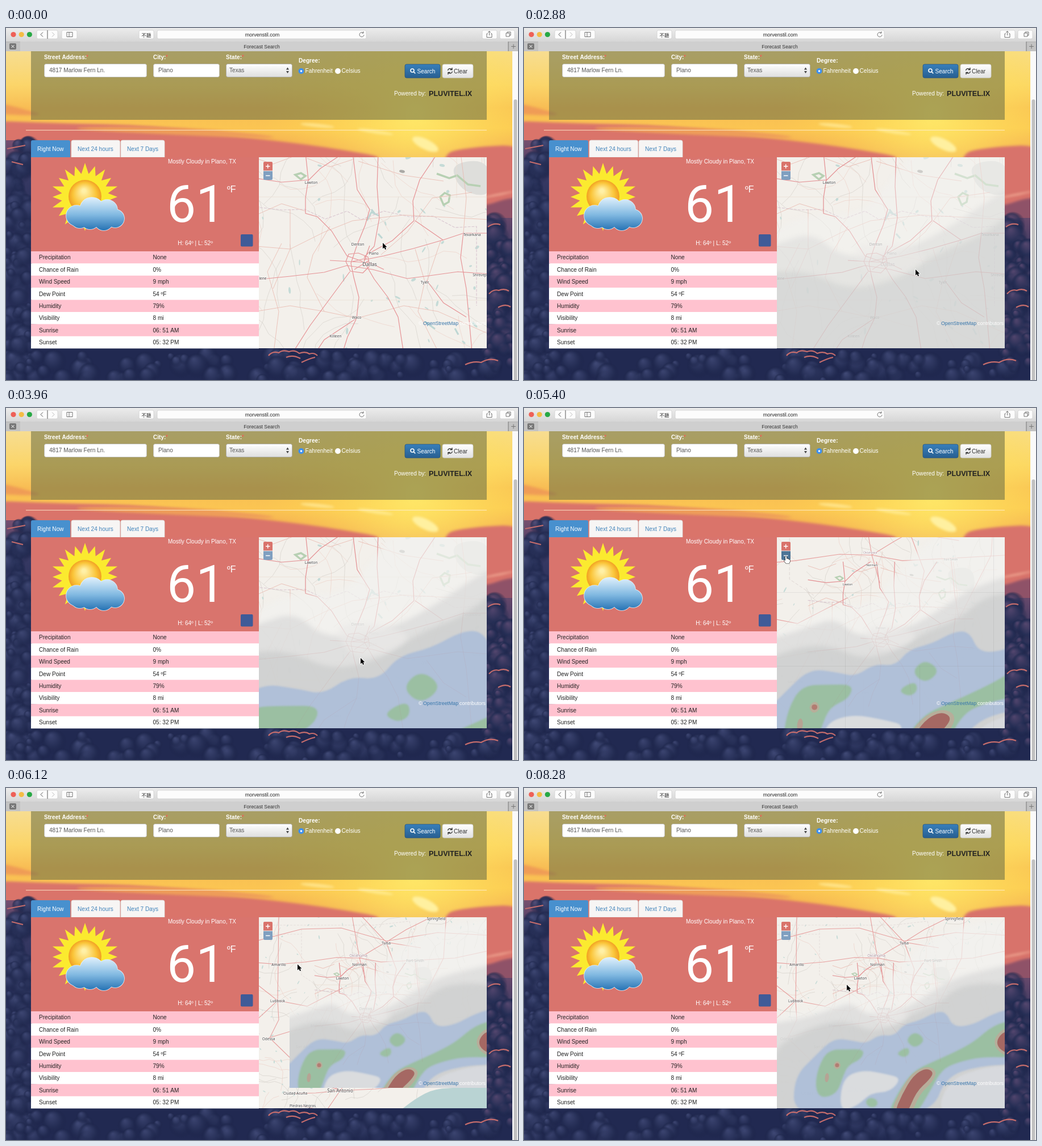
Recreate the animation shown at these times as an HTML page with a canvas. Size 901x621 px, loop 8640 ms.

```html
<!DOCTYPE html>
<html lang="en">
<head>
<meta charset="utf-8">
<title>Forecast Search</title>
<style>
html, body { margin: 0; width: 100%; height: 100%; overflow: hidden; }
canvas { display: block; }
</style>
</head>
<body>
<canvas id="stage" width="901" height="621"></canvas>
<script>
const STEP = 360, STEPS = 24;
const SANS = '"Liberation Sans", Arial, sans-serif';
const MAP = { x: 445, y: 228, w: 401, h: 337, cx: 645.75, cy: 396.5 };
const stage = document.getElementById('stage').getContext('2d');
let c = stage;

function rng(seed) {
  return () => (seed = (seed * 16807) % 2147483647) / 2147483647;
}
function rect(x, y, w, h, fill) {
  c.fillStyle = fill;
  c.fillRect(x, y, w, h);
}
function box(x, y, w, h, r, fill, line) {
  c.beginPath();
  c.roundRect(x, y, w, h, r);
  c.fillStyle = fill;
  c.fill();
  if (line) { c.lineWidth = 0.8; c.strokeStyle = line; c.stroke(); }
}
function disc(x, y, r, fill) {
  c.beginPath();
  c.arc(x, y, r, 0, 7);
  c.fillStyle = fill;
  c.fill();
}
function ellipse(x, y, rx, ry, turn, fill) {
  c.beginPath();
  c.ellipse(x, y, rx, ry, turn, 0, 7);
  c.fillStyle = fill;
  c.fill();
}
function text(s, x, y, color, size = 10.1, align = 'left', weight = '', family = SANS) {
  c.font = `${weight} ${size}px ${family}`;
  c.textAlign = align;
  c.fillStyle = color;
  c.fillText(s, x, y);
}
function line(d, color, width = 1) {
  c.strokeStyle = color;
  c.lineWidth = width;
  c.stroke(new Path2D(d));
}
function shade(y0, y1, ...stops) {
  const g = c.createLinearGradient(0, y0, 0, y1);
  stops.forEach((s, i) => g.addColorStop(i / (stops.length - 1), s));
  return g;
}
// Closed smooth shape through the midpoints of the given corners.
function blob(points, fill) {
  const at = i => points[i % points.length];
  const mid = i => [(at(i)[0] + at(i + 1)[0]) / 2, (at(i)[1] + at(i + 1)[1]) / 2];
  c.beginPath();
  c.moveTo(...mid(0));
  for (let i = 1; i <= points.length; i++) c.quadraticCurveTo(...at(i), ...mid(i));
  c.fillStyle = fill;
  c.fill();
}

function drawSky() {
  const g = c.createLinearGradient(0, 41, 0, 240);
  [[0, '#f7dd91'], [0.3, '#fbd569'], [0.5, '#f8bd54'], [0.68, '#fbc552'], [0.85, '#f3a953'], [1, '#e38660']]
    .forEach(s => g.addColorStop(...s));
  rect(0, 41, 891, 200, g);
  const glow = c.createRadialGradient(720, 150, 5, 720, 150, 270);
  glow.addColorStop(0, 'rgba(255,233,105,.95)');
  glow.addColorStop(1, 'rgba(255,217,75,0)');
  rect(0, 41, 891, 190, glow);
  c.filter = 'blur(2px)';
  blob([[-30, 128], [40, 145], [70, 155], [-30, 152]], '#ef9c56');
  blob([[-60, 162], [90, 168], [260, 172], [420, 193], [560, 209], [710, 236], [300, 250], [-60, 250]], '#da746a');
  blob([[60, 176], [300, 172], [520, 196], [340, 191]], '#ee9d59');
  ellipse(738, 205, 25, 9, 0.45, '#fff0a0');
  ellipse(650, 183, 32, 3, 0.15, '#ffe98a');
  ellipse(548, 172, 30, 3, 0.1, '#ffe48a');
  blob([[760, 224], [815, 210], [930, 205], [930, 340], [800, 330]], '#d8736b');
  ellipse(866, 294, 28, 1.5, -0.2, '#f1aa94');
  blob([[800, 320], [850, 312], [885, 299], [930, 300], [930, 650], [800, 640]], '#8f5268');
  c.filter = 'none';
  rect(0, 198, 46, 430, shade(198, 330, '#774f6e', '#373963', '#29305a'));
  rect(846, 335, 45, 286, shade(335, 400, '#67486b', '#32365f'));
  rect(0, 560, 891, 61, '#212951');
  const rand = rng(83);
  for (let i = 0; i < 280; i++) {
    const zone = i % 3, r = 7 + rand() * 17;
    const x = zone === 0 ? rand() * 44 : zone === 1 ? 846 + rand() * 45 : rand() * 891;
    const y = zone === 0 ? 205 + rand() * 400 : zone === 1 ? 345 + rand() * 260 : 578 + rand() * 45;
    const puff = c.createRadialGradient(x - r / 4, y - r / 2, 1, x, y, r);
    puff.addColorStop(0, zone === 1 ? 'rgba(87,72,112,.8)' : 'rgba(66,75,120,.75)');
    puff.addColorStop(0.6, 'rgba(37,46,85,.75)');
    puff.addColorStop(1, 'rgba(25,32,68,0)');
    disc(x, y, r, puff);
  }
  line('M462 578q7-9 18-5q7-6 18-2q10-4 18 3q11-4 18 1q8-3 14 3M493 581q12-5 25 2M520 590q14-7 24-9M808 594q14-7 28-4q15-9 30-3M850 469q8-9 17-6q10-4 18 1M848 351q10-8 22-4M866 493q13-7 22-1M2 213l32-6M10 236l20 5', '#c66d6c', 2.2);
  rect(891, 41, 10, 580, '#fafafa');
  box(893.5, 126, 6, 510, 3, '#c1c1c1');
}

function drawBrowser() {
  rect(0, 0, 901, 24, shade(0, 24, '#ececec', '#d6d6d6'));
  rect(0, 24, 901, 17, '#c3c3c3');
  rect(0, 24, 901, 0.7, '#aaa');
  rect(25, 24, 859, 17, '#cfcfcf');
  ['#ee6057', '#f4bc44', '#28a945'].forEach((f, i) => disc(13 + i * 14.2, 11.5, 4.6, f));
  [[54, 37], [98, 27], [234, 26], [266, 368], [838, 26], [869, 26]]
    .forEach(([x, w]) => box(x, 4, w, 15, 2.5, '#fcfcfc', '#d0d0d0'));
  line('M65 7.5l-4 4l4 4M73 4v15', '#555');
  line('M81 7.5l4 4l-4 4', '#bbb');
  line('M107 7.5h10v8h-10zM111 7.5v8M848 10h-2v6.500h9v-6.500h-2M850.500 13v-7M848 8l2.500-2.500l2.500 2.500M880 9h6v6h-6zM882 9v-2h6v6h-2M629 9a4 4 0 1 0 1 3M629 6v3h-3', '#666', 0.9);
  text('不聽', 247, 16, '#333', 8.5, 'center', '', '"Noto Sans CJK TC", "Noto Sans CJK SC", sans-serif');
  text('morvenstil.com', 451, 15, '#222', 9, 'center');
  text('Forecast Search', 450, 36, '#333', 8.7, 'center');
  box(6, 27, 12, 11, 2, '#777');
  line('M9.500 30l5 5m0-5l-5 5', '#fff');
  line('M889 32.500h8M893 28.500v8M884 24v17', '#777');
}

function drawForm() {
  rect(44, 41, 802, 121, 'rgba(113,115,72,.58)');
  [['Street Address:', 67, 141, 55], ['City:', 259, 281, 55], ['State:', 387, 415, 55], ['Degree:', 515, 0, 61]]
    .forEach(([s, x, star, y]) => {
      text(s, x, y, '#fff', 10.1, 'left', 'bold');
      if (star) text('*', star, y, '#f55', 10);
    });
  box(67.5, 63.5, 180, 23, 3, '#fff', '#bbb');
  box(259.5, 63.5, 116, 23, 3, '#fff', '#bbb');
  box(387.5, 63.5, 116, 23, 3, shade(63, 87, '#fff', '#dedede'), '#aaa');
  text('4817 Marlow Fern Ln.', 76, 78, '#555');
  text('Plano', 268, 78, '#555');
  text('Texas', 393, 78, '#555');
  c.fillStyle = '#444';
  c.fill(new Path2D('M493 73.500l2.500-4l2.500 4zM493 76l2.500 4l2.500-4z'));
  disc(519.5, 76, 5, '#3c8ff0');
  disc(519.5, 76, 1.8, '#fff');
  disc(584, 76, 5, '#fff');
  text('Fahrenheit', 526.5, 79, '#fff');
  text('Celsius', 590.5, 79, '#fff');
  box(702, 64, 62, 24, 3, shade(64, 88, '#377fbb', '#285f91'), '#245580');
  box(768, 64, 54, 24, 3, shade(64, 88, '#fff', '#e2e2e2'), '#ccc');
  line('M718 75a3 3 0 1 0-6 0a3 3 0 1 0 6 0M717.300 77.300l3 3', '#fff', 1.6);
  line('M777.500 75a4 4 0 0 1 7-2M785.500 76.500a4 4 0 0 1-7 2M785 70v3.500h-3.500M778 82v-3.500h3.500', '#333', 1.3);
  text('Search', 723.5, 80, '#fff');
  text('Clear', 788, 80, '#333');
  text('Powered by:', 683, 119, '#fff');
  text('PLUVITEL.IX', 744, 119.5, '#222', 12.6, 'left', 'bold');
  rect(35, 179.7, 811, 1.2, 'rgba(255,239,210,.75)');
  box(44, 198, 69, 31, [3, 3, 0, 0], '#4890ce');
  box(115, 198, 85.5, 30, [3, 3, 0, 0], '#f7f5f4', '#ddd');
  box(202, 198, 77, 30, [3, 3, 0, 0], '#f7f5f4', '#ddd');
  text('Right Now', 55, 217, '#fff');
  text('Next 24 hours', 126, 217, '#4184bb');
  text('Next 7 Days', 213, 217, '#4184bb');
}

function drawSun() {
  c.beginPath();
  for (let i = 0; i < 40; i++) {
    const r = i % 2 ? 41 : i % 4 ? 57 : 60, a = i * Math.PI / 20 - Math.PI / 2;
    c.lineTo(139 + r * Math.cos(a), 298 + r * Math.sin(a));
  }
  c.closePath();
  c.fillStyle = '#fbea2f';
  c.fill();
  const g = c.createRadialGradient(137, 287, 3, 139, 297, 30);
  g.addColorStop(0, '#fff0a6');
  g.addColorStop(0.65, '#fac438');
  g.addColorStop(1, '#f09a20');
  disc(139, 297, 29, g);
  const puffs = [[124, 331, 18], [151, 320, 21], [178, 321, 18], [192, 336, 16], [172, 340, 17], [148, 338, 17], [130, 336, 17]];
  puffs.forEach(([x, y, r]) => disc(x, y, r + 0.8, '#e5f2fb'));
  const blue = shade(300, 358, '#dceefa', '#83bae2', '#2370b2');
  puffs.forEach(([x, y, r]) => disc(x, y, r, blue));
}

function drawWeather() {
  rect(44, 228, 401, 166, '#d9746d');
  drawSun();
  text('Mostly Cloudy in Plano, TX', 345, 239, '#fff', 10, 'center');
  text('61', 283, 342, '#fff', 91, 'left', '', 'Roboto, sans-serif');
  text('ºF', 389, 290, '#fff', 16);
  text('H: 64º | L: 52º', 333, 383, '#fff', 10, 'center');
  box(413, 364, 21.5, 21.5, 2, '#3f5b98');
  const rows = [['Precipitation', 'None'], ['Chance of Rain', '0%'], ['Wind Speed', '9 mph'], ['Dew Point', '54 ºF'],
    ['Humidity', '79%'], ['Visibility', '8 mi'], ['Sunrise', '06: 51 AM'], ['Sunset', '05: 32 PM']];
  rows.forEach(([name, value], i) => {
    const y = 394 + i * 21.4;
    rect(44, y, 401, 21.6, i % 2 ? '#fff' : '#ffc2cf');
    text(name, 58, y + 14.4, '#222');
    text(value, 258.5, y + 14.4, '#222');
  });
}

const roads = {
  red: `M527 220L532 268L527 300L527 327L548 333L573 358L600 402L628 412M595 220L553 248L531 270M610 220L618 285L640 320
    L632 348L617 385L607 415L612 440L621 475L617 512L601 545L590 580M640 384L630 412L648 443L672 475L690 510L700 575
    M440 444L500 438L560 431L600 419L645 426L706 442L745 437L795 430L850 434M630 409L665 402L717 389L769 374L805 362L850 362
    M655 220L653 280L657 335L648 385L630 405M760 220L728 268L716 305L718 340L680 375L640 397M440 265L485 272L532 268
    M570 410L640 414L665 426M598 412L603 399L620 397L637 404L640 420L628 432L606 429Z M610 412L635 406M613 426L639 410
    M805 360L800 405L810 460L820 570M740 445L770 485L810 510M617 512L560 550L540 580M720 340L769 374M500 580L535 525L605 430`,
  pale: `M440 330L485 310L527 323M440 385L500 390L560 360L610 340L700 330L850 338M440 500L500 490L560 500L617 512L700 490L760 500L850 540
    M470 580L480 500L460 430L485 380M440 230L470 240L510 225M570 350L540 400L530 440L560 500M660 400L706 360L750 300L820 290
    M720 390L737 447L725 500L760 570M620 235L700 260L770 270M765 375L740 450M500 320L500 390L470 460M530 230L570 245L610 232M800 220L810 300L805 360`,
  border: 'M440 316L486 321L526 320L562 337L600 323L625 338L665 323L710 333L752 332L790 352L828 350V490'
};
const wideRoads = `M622 300L582 299L527 307L479 311L440 308M622 300L648 284L669 272L704 250L740 232L770 220M622 300L660 307L720 304L790 300L850 287
  M622 300L608 220M480 220L479 311L478 375L480 409L464 441M440 270L520 249L590 247L670 270L760 255L850 260M478 375L530 385L592 353
  M462 441L505 428L546 421M612 454L612 500L588 534L560 575M588 534L650 531L715 525L780 520M672 450L700 490L715 525M588 534L540 515L464 441
  M546 421L527 457L550 510L588 534M509 539L545 538L588 534M522 561L560 570M669 272L687 320L681 350M720 304L725 350L730 379M775 220L770 300L730 379M622 300L632 335M440 345L478 375L440 410M620 220L669 272L730 282`;

const labelsNear = [['Lawton', 537, 275], ['Denton', 619, 384], ['Plano', 647, 400], ['Dallas', 640, 419.5, 9], ['Texarkana', 820, 366.5],
  ['Shreveport', 838, 438], ['Tyler', 737, 451], ['Waco', 617, 513], ['Killeen', 580, 545.5], ['Abilene', 447, 444]];
const labelsFar = [['Springfield', 757, 232.5], ['Tulsa', 669, 275.5], ['Oklahoma', 620, 298], ['Amarillo', 480, 313.5], ['Norman', 622, 313.5],
  ['Fort Smith', 720, 306.5], ['Lawton', 592, 337.5], ['Lubbock', 478, 378], ['Denton', 633, 392], ['Dallas', 641, 409, 8], ['Abilene', 547, 422],
  ['Odessa', 462, 444.5], ['San Angelo', 527, 459], ['Waco', 614, 472], ['Austin', 612, 504], ['San Antonio', 588, 536.5, 8],
  ['Shreveport', 741, 418], ['Ciudad Acuña', 509, 540.5], ['Piedras Negras', 522, 563]];

function zoomTo(k) {
  c.translate(MAP.cx, MAP.cy);
  c.scale(k, k);
  c.translate(-MAP.cx, -MAP.cy);
}

function drawTerrain(k) {
  c.save();
  zoomTo(k);
  const rand = rng(2718), px = 1 / k;
  for (let i = 0; i < 130; i++) {
    let x = 200 + rand() * 900, y = 30 + rand() * 740, a = rand() * 6.3;
    c.beginPath();
    c.moveTo(x, y);
    for (let j = 0; j < 7; j++) {
      a += (rand() - 0.5) * 1.1;
      x += Math.cos(a) * 22;
      y += Math.sin(a) * 22;
      c.lineTo(x, y);
    }
    c.lineWidth = 0.65 * px;
    c.strokeStyle = i % 3 ? '#d4d0c9' : '#edcfc6';
    c.stroke();
  }
  for (let i = 0; i < 150; i++) {
    const x = 200 + rand() * 900, y = 30 + rand() * 740;
    ellipse(x, y, 2 + rand() * 5, 1 + rand() * 1.6, rand() * 3, '#c5dbd7');
  }
  blob([[785, 238], [850, 232], [855, 295], [816, 294], [791, 272]], '#dededb');
  line('M758 257l22 8l14-5l19 16l22 3M764 298l8-7l9 4l-2 12l-9 5zM509 259l10-3l8 5l-8 6z', '#b7d0b3', 3.5);
  line('M635 340l8-15l13 6M755 531l-18-13M790 530l6 11M655 363l7 8M650 329l-7-9', '#bed7d4', 3);
  ellipse(697, 253, 5, 2.5, 0.2, '#aaa9a5');
  line('M440 298H850M440 480H850M793 220V300', '#eadfd4', 0.8 * px);
  c.setLineDash([5 * px, 2 * px]);
  line(roads.border, '#d9c6d0', 1.1 * px);
  c.setLineDash([]);
  line(roads.pale, '#e9b8ae', 0.8 * px);
  line(roads.red, '#e69396', 1.2 * px);
  c.restore();
  if (k === 1) return;
  c.save();
  zoomTo(2 * k);
  blob([[680, 580], [720, 548], [755, 530], [802, 529], [870, 515], [880, 610], [700, 610]], '#b9d3d3');
  c.setLineDash([4, 2]);
  line('M440 242H648L710 235M520 249V330L550 350M440 258H519M710 235L730 320L731 380', '#ded6d4', 0.7);
  c.setLineDash([]);
  line(wideRoads, '#e7a09f', 0.55 / k);
  c.restore();
}

function drawLabels(k) {
  const near = k === 1, z = near ? 1 : 2 * k;
  for (const [name, x, y, size = 6.5] of near ? labelsNear : labelsFar) {
    const lx = MAP.cx + (x - MAP.cx) * z, ly = MAP.cy + (y - MAP.cy) * z;
    c.font = `${k > 0.6 && !near ? 5 : size}px "Noto Sans", sans-serif`;
    c.textAlign = 'center';
    c.lineWidth = 1.5;
    c.strokeStyle = 'rgba(255,255,255,.7)';
    c.strokeText(name, lx, ly);
    c.fillStyle = name === 'Oklahoma' ? '#a7919d' : '#484848';
    c.fillText(name, lx, ly);
  }
}

function drawClouds(alpha) {
  c.globalAlpha = alpha;
  c.filter = 'blur(4px)';
  blob([[390, 405], [470, 399], [535, 382], [570, 362], [622, 363], [650, 325], [700, 275], [760, 246], [860, 228], [920, 240], [920, 640], [390, 640]], 'rgba(242,241,239,.72)');
  blob([[390, 420], [480, 410], [545, 389], [577, 378], [603, 402], [655, 396], [700, 373], [750, 337], [840, 314], [920, 300], [920, 640], [390, 640]], 'rgba(216,216,215,.68)');
  blob([[430, 465], [490, 430], [535, 413], [574, 413], [610, 430], [655, 419], [685, 397], [728, 381], [770, 345], [860, 345], [910, 360], [900, 640], [430, 630]], 'rgba(199,200,201,.58)');
  blob([[610, 389], [650, 388], [683, 399], [655, 416], [625, 418]], 'rgba(234,233,231,.7)');
}

function drawRain(alpha) {
  c.globalAlpha = alpha;
  c.filter = 'blur(1.5px)';
  blob([[475, 510], [515, 470], [545, 441], [580, 446], [602, 451], [625, 435], [651, 438], [668, 417], [697, 410], [724, 395], [743, 395], [755, 422],
    [790, 418], [825, 398], [880, 382], [880, 487], [800, 490], [742, 510], [720, 570], [620, 585], [475, 580]], '#aebfd8');
  blob([[560, 512], [595, 497], [640, 505], [664, 512], [645, 536], [610, 538], [588, 560], [555, 572]], '#dcdddf');
  blob([[745, 515], [815, 491], [870, 490], [870, 590], [725, 585]], '#d7d9dd');
  const green = '#9abf9f', tan = '#b9ad99', red = '#a46460';
  blob([[518, 492], [535, 462], [570, 461], [599, 461], [594, 478], [570, 489], [561, 510], [551, 539], [522, 548], [512, 527]], green);
  blob([[671, 445], [688, 429], [707, 444], [688, 460]], green);
  blob([[654, 468], [676, 456], [679, 469], [668, 476]], green);
  blob([[638, 580], [659, 535], [684, 500], [715, 485], [756, 467], [792, 448], [826, 418], [870, 407], [870, 476], [807, 474], [762, 484], [735, 497], [715, 534], [688, 580]], green);
  ellipse(612, 555, 10, 8, 0.2, green);
  c.filter = 'blur(.7px)';
  blob([[644, 575], [661, 536], [683, 502], [710, 490], [727, 499], [719, 519], [696, 540], [680, 580]], tan);
  blob([[651, 575], [665, 541], [685, 507], [707, 494], [721, 501], [714, 514], [690, 536], [673, 578]], red);
  blob([[543, 489], [552, 480], [559, 490], [550, 498]], tan);
  ellipse(551, 489, 3.5, 3.5, 0, '#b17970');
  ellipse(533, 511, 3.5, 8, 0.1, '#b8a293');
  blob([[825, 446], [842, 424], [870, 420], [870, 480], [836, 468]], tan);
  blob([[830, 447], [845, 428], [870, 430], [870, 474], [839, 464]], red);
}

function drawOverlay(i, k) {
  if (i < 7) return;
  c.save();
  if (i === 16 || i === 17) {
    c.beginPath();
    c.rect(499, 228, 347, 301);
    c.clip();
  }
  zoomTo(2 * k);
  drawClouds(i === 7 ? 0.35 : i === 8 ? 0.7 : 1);
  if (i > 8) drawRain(i === 9 ? 0.3 : i === 10 ? 0.65 : 0.94);
  c.restore();
  // A trace of the terrain stays readable through the weather layer.
  c.save();
  c.globalAlpha = 0.09;
  zoomTo(k);
  line(roads.red, '#b86f75', 1 / k);
  c.restore();
}

function drawMap(i) {
  const k = i < 15 ? 1 : i === 15 ? 0.71 : 0.5;
  c.save();
  c.beginPath();
  c.rect(MAP.x, MAP.y, MAP.w, MAP.h);
  c.clip();
  rect(MAP.x, MAP.y, MAP.w, MAP.h, '#f3f0eb');
  drawTerrain(k);
  drawLabels(k);
  drawOverlay(i, k);
  if (i === 15) line('M565.500 325V565M696.500 455V565M826.500 228V565M445 325.500H846M445 455.500H846', 'rgba(120,120,120,.18)', 0.7);
  text('©', 726, 524, '#fff', 8.8);
  text('OpenStreetMap', 734, 524, '#3977ac', 8.8);
  text('contributors', 798, 524, '#fff', 8.8);
  box(453, 236, 16, 15.5, [2, 2, 0, 0], '#d9736b');
  box(453, 252.5, 16, 15.5, [0, 0, 2, 2], i >= 14 && i <= 16 ? '#4d7596' : '#7f9fc0');
  line('M457 244h7.500M460.700 240.300v7.500M457 260.500h7.500', '#fff', 1.4);
  c.restore();
}

const trail = [[0, 663, 379], [5, 694, 400], [6, 696, 402], [8, 689, 426], [11, 624, 441], [12, 545, 360],
  [13, 470, 285], [14, 461, 262], [16, 461, 262], [17, 513, 311], [23, 568, 347]];

function drawPointer(i) {
  const n = Math.max(1, trail.findIndex(p => p[0] >= i));
  const [a, x0, y0] = trail[n - 1], [b, x1, y1] = trail[n], f = (i - a) / (b - a);
  const hand = i >= 14 && i <= 16;
  c.save();
  c.translate(x0 + (x1 - x0) * f, y0 + (y1 - y0) * f);
  const shape = new Path2D(hand
    ? 'M-1 0Q0-1.500 1 0V4Q2.500 3 3.500 4.500Q5 4 5.500 5.500Q7 5 7 7V9L5.500 12H0L-3.500 7.500Q-3.500 6-1 7Z'
    : 'M0 0V10.500L2.500 8.300L4.200 12L6 11.100L4.400 7.600H7.500Z');
  c.lineWidth = hand ? 1.2 : 1.5;
  c.strokeStyle = hand ? '#222' : '#fff';
  c.stroke(shape);
  c.fillStyle = hand ? '#fff' : '#000';
  c.fill(shape);
  c.restore();
}

const page = document.createElement('canvas');
page.width = 901;
page.height = 621;
c = page.getContext('2d');
drawSky();
drawBrowser();
drawForm();
drawWeather();
c = stage;

let shown = -1;
const start = performance.now();
function frame() {
  const i = Math.floor((performance.now() - start) / STEP) % STEPS;
  if (i !== shown) {
    shown = i;
    c.drawImage(page, 0, 0);
    drawMap(i);
    drawPointer(i);
  }
  requestAnimationFrame(frame);
}
frame();
</script>
</body>
</html>
```
